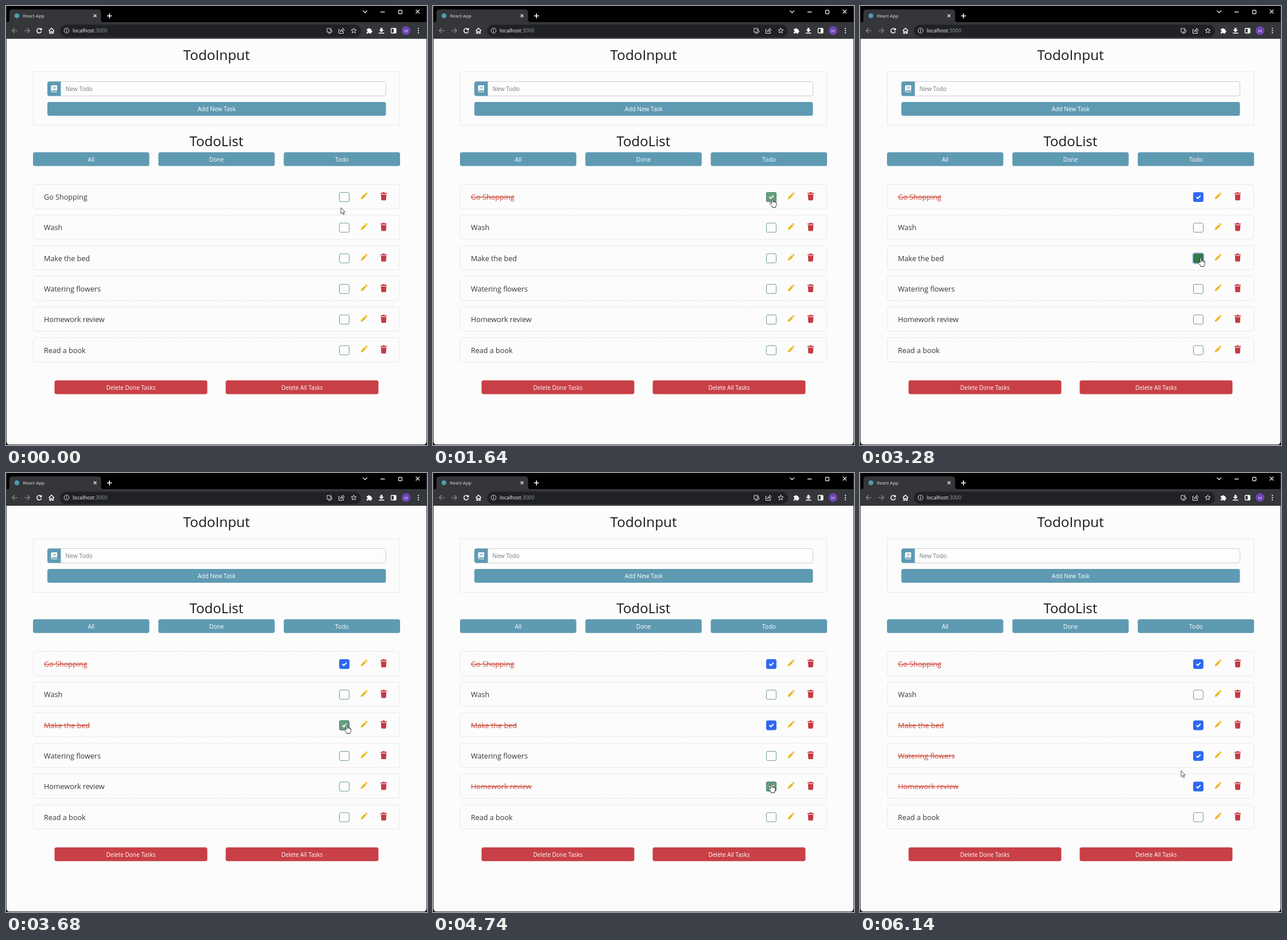
These frames come from a looping animation (733x764 px, 6160 ms). An HTML page:

```html
<!DOCTYPE html>
<html lang="en">
<head>
<meta charset="utf-8">
<title>Todo</title>
<style>
  html, body { margin: 0; width: 100%; height: 100%; overflow: hidden; background: #000; }
  svg { display: block; width: 733px; height: 764px; }
  text { font-family: "Open Sans", "Noto Sans", sans-serif; white-space: pre; }
  .line { fill: none; stroke: #e4e5e7; stroke-width: 1.3; }
</style>
</head>
<body>
<svg id="stage" viewBox="0 0 733 764"></svg>
<script>
const LOOP = 6160, PITCH = 53.3, FADE = 150;
const TEAL = '#5f9ab3', RED = '#c84046', PAGE = '#fcfcfc';
const tasks = ['Go Shopping', 'Wash', 'Make the bed', 'Watering flowers', 'Homework review', 'Read a book'];

// Each click checks a task, then reloads the page.
const clicks = [
  { row: 0, press: 420, load: 510, blank: 580, back: 1120, flash: true },
  { row: 2, press: 3260, load: 3400, blank: 3480, back: 3660 },
  { row: 4, press: 4240, load: 4320, blank: 4420, back: 4700, flash: true },
  { row: 3, press: 5320, load: 5420, blank: 5500, back: 5680 }
];
// Pointer stops: time, x, y
const path = [
  [0, 583, 351], [260, 591, 335], [1700, 591, 335], [2000, 590, 444],
  [2380, 590, 446.9], [2400, 590, 447.8], [2700, 593.5, 438], [3700, 593.5, 438],
  [4000, 589, 541], [4860, 589, 541], [5300, 592, 489], [5700, 592, 489], [6140, 559, 518]
];

const rect = (x, y, w, h, r, fill, more = '') =>
  `<rect x="${x}" y="${y}" width="${w}" height="${h}" rx="${r}" fill="${fill}" ${more}/>`;
const text = (s, x, y, size, fill, more = '') =>
  `<text x="${x}" y="${y}" font-size="${size}" fill="${fill}" ${more}>${s}</text>`;
const centered = (s, x, y, size, fill, weight = 400) =>
  text(s, x, y, size, fill, `text-anchor="middle" font-weight="${weight}"`);
const line = (d, more = '') => `<path class="line" d="${d}" ${more}/>`;
const shape = (d, fill, more = '') => `<path d="${d}" fill="${fill}" ${more}/>`;
const circle = (x, y, r, fill) => `<circle cx="${x}" cy="${y}" r="${r}" fill="${fill}"/>`;
const at = (x, y, s) => `<g transform="translate(${x} ${y})">${s}</g>`;
const button = (s, x, y, w, fill, size = 10.2) =>
  rect(x, y, w, 24, 3.5, fill) + centered(s, x + w / 2, y + 16, size, '#fff');

const star = 'M' + Array.from({ length: 10 }, (_, i) => {
  const a = i * Math.PI / 5, r = i % 2 ? 2.1 : 4.8;
  return `${(r * Math.sin(a)).toFixed(2)} ${(-r * Math.cos(a)).toFixed(2)}`;
}).join('L') + 'Z';

const chrome =
  rect(0, 0, 733, 57, 0, '#000') +
  shape('M0 28H3Q6 28 6 24V11Q6 6 11 6H160Q165.500 6 165.500 11V24Q165.500 28 169 28H733V57H0Z', '#35363a') +
  text('React App', 29.5, 20, 8, '#e4e5e7') +
  line('M152.500 14.500l5 5m0 -5l-5 5') +
  line('M176 17.300h8.400m-4.200 -4.200v8.400', 'style="stroke:#fff;stroke-width:1.6"') +
  line('M621.500 8l3.700 3.800l3.700 -3.800M652 10.500h7.500M713.500 6.500l6.500 6.500m0 -6.500l-6.500 6.500') +
  rect(683.500, 7.500, 6, 6, 1.2, 'none', 'class="line"') +
  line('M20 42.800H11M15 38.500l-4.300 4.300l4.300 4.300M32 42.800h9M37 38.500l4.300 4.300l-4.300 4.300', 'style="stroke:#85878b"') +
  line('M74.500 43l4.700 -4.500l4.700 4.500M76 42.500v5h2v-3h2.400v3h2v-5', 'style="stroke:#fff"') +
  rect(94, 32.500, 524, 21.500, 10.700, '#202124') +
  `<circle class="line" cx="105.500" cy="42.800" r="4.300" style="stroke-width:1"/>` +
  line('M105.500 42.300v2.800M105.500 40.200v1.200', 'style="stroke-width:1.1"') +
  text('localhost<tspan fill="#9aa0a6">:3000</tspan>', 116, 46, 8.950, '#fff') +
  line('M564 39h-5v6.500h8.500v-2.500M561 47.500h4.500M565.500 38v5m-2.200 -2l2.200 2.200l2.200 -2.200M581 40.500h-1.500v7h8v-2.500M582 45q.5 -4 4 -4v-2.500l3 3.300l-3 3v-2q-2.500 0 -4 2.200', 'style="stroke-width:1"') +
  at(605.5, 43, line(star, 'style="stroke-width:1"')) +
  shape('M628 40h2.300a1.600 1.600 0 0 1 3.200 0h2.500v2.500a1.700 1.700 0 0 1 0 3.400v2h-3a1.500 1.500 0 0 0 -3 0h-2v-2.500a1.600 1.600 0 0 0 0 -3.200z', '#fff') +
  shape('M652 38h3.400v3.500h2.600l-4.300 4.300l-4.300 -4.300h2.600zM649 46.500h9.500v1.500h-9.500z', '#fff') +
  rect(670.5, 39, 8.5, 8, 1, 'none', 'class="line" style="stroke:#fff"') + rect(675, 39, 4, 8, 0, '#fff') +
  circle(696.500, 42.800, 7.500, '#6f45b5') + centered('H', 696.5, 45.8, 8, '#fff') +
  [39, 42.8, 46.6].map(y => circle(718, y, 1.1, '#fff')).join('');

const form =
  centered('TodoInput', 366.5, 94, 24.3, '#17191c', 500) +
  rect(47.5, 114.5, 638, 93, 0, 'none', 'stroke="#dcdfdc" stroke-dasharray="2 1"') +
  rect(72.5, 131.5, 589, 25, 3.5, '#fdfdfd', 'stroke="#cbced7"') +
  shape('M95.500 131.500H75.500Q72 131.500 72 135V153Q72 156.500 75.500 156.500H95.500Z', TEAL) +
  shape('M80.500 138H89V147H80.500a1 1 0 0 0 0 2H89V150H80.500Q78.500 150 78.500 148V140Q78.500 138 80.500 138Z', '#fff') +
  line('M81.500 141h5.500m-5.500 2h5.500', `style="stroke:${TEAL};stroke-width:.9"`) +
  text('New Todo', 103.5, 148, 10.2, '#777b80') +
  button('Add New Task', 72, 167, 589.5, TEAL) +
  centered('TodoList', 366.3, 244, 24, '#17191c', 500) +
  button('All', 47, 254.5, 202.5, TEAL) +
  button('Done', 265.3, 254.5, 202.5, TEAL) +
  button('Todo', 483.6, 254.5, 202.5, TEAL);

const footer = y => button('Delete Done Tasks', 84.5, y, 266, RED, 10.05) +
  button('Delete All Tasks', 382.5, y, 266, RED, 10.05);

const pencil = shape('M617.500 336.500l1 -3.700l6 -6l2.800 2.800l-6 6zM625.300 326l1.200 -1.200q.7 -.6 1.300 0l1.300 1.300q.6 .700 0 1.300l-1.200 1.200z', '#efb82d');
const trash = shape('M652 325.300h3.300l.8 -1.300h2.900l.8 1.300h3.300v1.700h-11.100zM652.800 328h9.500l-.6 9q-.1 1.200 -1.300 1.200h-5.700q-1.200 0 -1.300 -1.200z', '#c53a43');
const arrow = shape('M0 0V10.500L2.500 8.300L4.200 12.200L5.900 11.500L4.200 7.700H7.300Z', '#fff', 'stroke="#222" stroke-width=".8" stroke-linejoin="round"');
const hand = shape('M-1.400 8V1Q-1.400 0 -.3 0T.9 1V5Q2.300 4.300 3.100 5.400Q4.400 4.900 5.200 6Q7 5.700 7 7.500V10.500Q7 12.500 5.500 14V15.500H-.2V14L-4.300 9.500Q-5 8 -3.700 7.500Q-2.500 7.300 -1.400 9Z', '#fff', 'stroke="#222" stroke-width=".9" stroke-linejoin="round"') +
  shape('M.9 5v2.500M3.100 5.400v2.300M5.200 6v2', 'none', 'stroke="#222" stroke-width=".7"');

function pointer(t) {
  const i = path.findIndex(p => p[0] > t);
  if (i < 1) return path[i ? path.length - 1 : 0].slice(1);
  const [t0, x0, y0] = path[i - 1], [t1, x1, y1] = path[i];
  const u = (t - t0) / (t1 - t0), e = u * u * (3 - 2 * u);
  return [x0 + (x1 - x0) * e, y0 + (y1 - y0) * e];
}

function rowUnder(t) {
  const [x, y] = pointer(t), d = y - 324.5;
  return x > 580 && x < 598 && d >= 0 && d % PITCH < 16.5 ? Math.floor(d / PITCH) : -1;
}

// Share of the last FADE milliseconds spent over the checkbox
function hover(t, row) {
  let n = 0;
  for (let k = 0; k < 15; k++) n += rowUnder(Math.max(0, t - k * FADE / 15)) === row;
  return n / 15;
}

function task(name, i, t) {
  const click = clicks.find(c => c.row === i);
  const done = click && t >= click.load - 20;
  const focus = click && t >= click.press && !done;
  const label = done ? 'text-decoration="line-through"' : '';
  const box = (fill, more) => rect(580.5, 324.5, 17, 16, 2.5, fill, more);
  return `<g transform="translate(0 ${(i * PITCH).toFixed(1)})">` +
    rect(47.5, 310.5, 638, 42.3, 3.5, 'none', 'stroke="#dfe2dc" stroke-dasharray="2 1"') +
    text(name, 66, 337, 12.6, done ? '#ce4a3d' : '#34373a', label) +
    (focus ? rect(579.5, 323.5, 19, 18, 3.5, 'none', 'stroke="#bfd3fa" stroke-width="3"') : '') +
    box(done ? '#2f69f2' : '#fdfdfd', `stroke="${done ? '#2f69f2' : '#71999a'}"`) +
    box(done ? '#68a07f' : '#357a49', `stroke="#3b7f55" opacity="${hover(t, i)}"`) +
    (done ? line('M585.800 332.500l2.400 2.400l4.600 -4.800', 'style="stroke:#fff;stroke-width:2"') : '') +
    pencil + trash + '</g>';
}

const stage = document.getElementById('stage');
stage.innerHTML = shape('M1 57H732V758Q732 763.500 726 763.500H7Q1 763.500 1 758Z', PAGE) + chrome +
  line('M.5 0V758Q.5 763.500 6 763.500H727Q732.500 763.500 732.500 758V0', 'style="stroke:#3a3a3c;stroke-width:1"') +
  '<g id="live"></g>';
const live = document.getElementById('live');

function draw(now) {
  const t = now % LOOP;
  const loading = clicks.some(c => t >= c.load && t < c.blank + 80);
  const empty = clicks.some(c => t >= c.blank && t < c.back);
  const flash = clicks.some(c => c.flash && t >= c.blank && t < c.blank + 40);
  const [x, y] = pointer(t);
  let page = '';
  if (!flash) page = form + (empty ? footer(310.5) : tasks.map((s, i) => task(s, i, t)).join('') + footer(651.5));
  live.innerHTML = page +
    circle(19, 17, 4.300, loading ? '#a4a7aa' : '#4d9cac') +
    (loading
      ? line('M54.500 39.500l7 7m0 -7l-7 7', 'style="stroke:#fff;stroke-width:1.5"')
      : line('M61 40.500a4 4 0 1 0 .7 3.500M61.700 38.500v3h-3', 'style="stroke:#fff;stroke-width:1.500"')) +
    at(x.toFixed(1), y.toFixed(1), rowUnder(t) >= 0 && !loading ? hand : arrow);
}

const start = performance.now();
(function tick() {
  draw(performance.now() - start);
  requestAnimationFrame(tick);
})();
</script>
</body>
</html>
```
